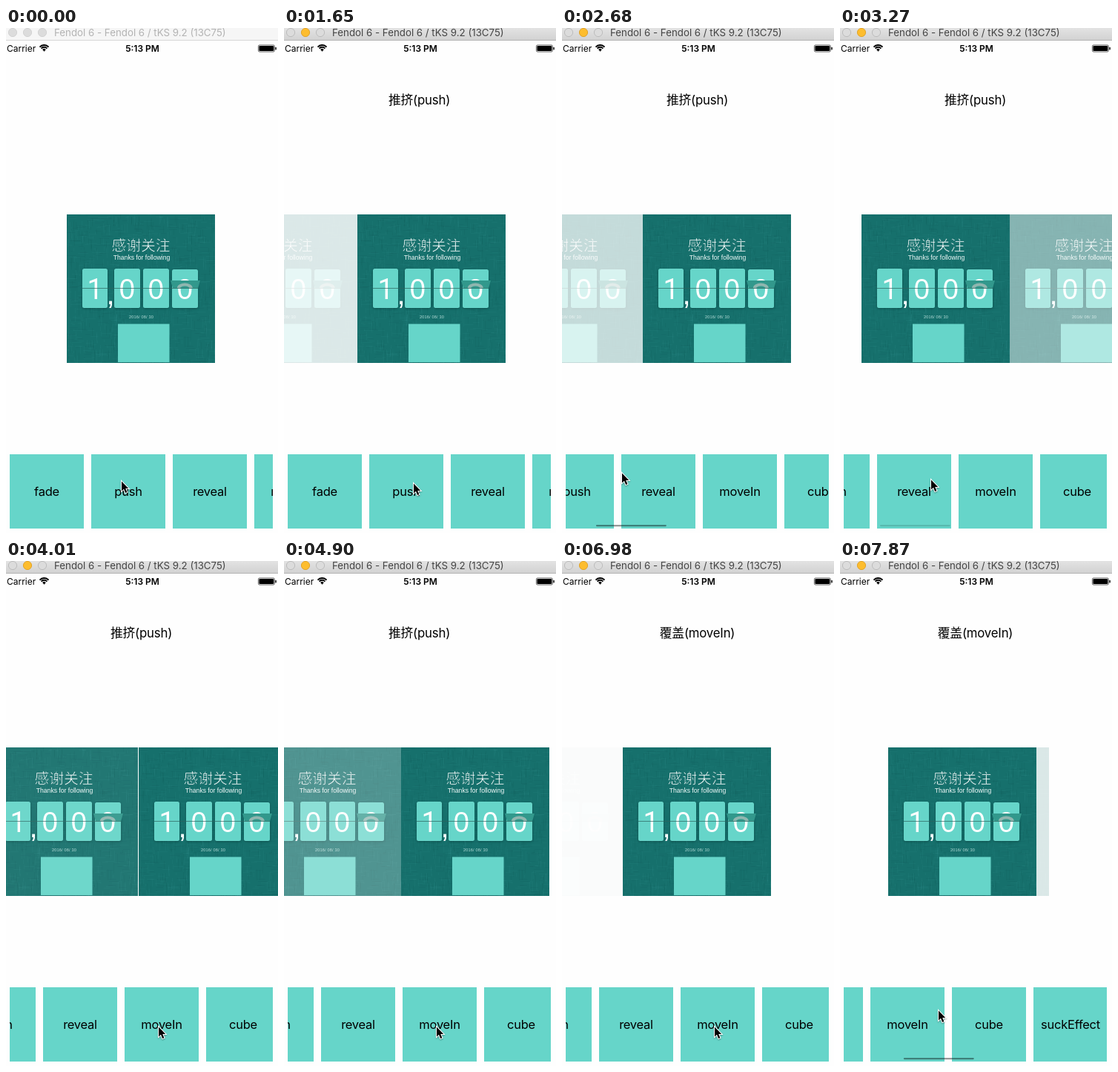
Animation of 367x680 px, one loop 8000 ms. Source, as an HTML page with a canvas:

```html
<!DOCTYPE html>
<html lang="zh-CN">
<head>
<meta charset="utf-8">
<title>Transitions</title>
<style>
html, body { margin: 0; width: 100%; height: 100%; overflow: hidden; background: #fefefe; }
canvas { display: block; }
</style>
</head>
<body>
<canvas id="stage" width="367" height="680"></canvas>
<script>
const W = 367, H = 680, LOOP = 8000, TICKS = 54;
const UI = 'Inter, "Noto Sans CJK SC", "Noto Sans CJK", sans-serif';
const HAN = '"Noto Sans CJK SC", "Noto Sans CJK", sans-serif';
const ARIAL = '"Liberation Sans", Arial, sans-serif';
const MINT = '#66d5c9', TEAL = '#16706c', PAPER = '#fefefe';
const CELLS = ['fade', 'push', 'reveal', 'moveIn', 'cube', 'suckEffect'];

// Times in ticks; RATE is the part of a transition done per tick.
const RATE = 0.15, PUSH = 10.45, REPEATS = 5, MOVE = 46.9;
const DRAGS = [{ from: 14, to: 18, glide: 30 }, { from: 49, to: 53, glide: 0 }];
const STOPS = [
  { from: 0, to: 1, x: 155, y: 612 },
  { from: 4, to: 6.4, x: 244, y: 627 },
  { from: 6.4, to: 9, x: 174, y: 612 },
  { from: 12, to: 14, x: 225, y: 604 },
  { from: 14, to: 18, x: 80, y: 598 },
  { from: 20, to: 26, x: 205, y: 626 },
  { from: 47, to: 49, x: 251, y: 606 },
  { from: 49, to: 53, x: 132, y: 604 }
];

const g = document.getElementById('stage').getContext('2d');
const clamp = v => Math.max(0, Math.min(1, v));
const mix = (a, b, u) => a + (b - a) * u;

function cursorAt(k) {
  let x = 155, y = 609;
  for (const s of STOPS) {
    const u = clamp((k - s.from) / (s.to - s.from));
    x = mix(x, s.x, u);
    y = mix(y, s.y, u);
  }
  return { x, y };
}

// The row follows the cursor during a drag, then glides on.
function scrollAt(k) {
  let off = 0;
  for (const d of DRAGS) {
    if (k < d.from) continue;
    off += cursorAt(d.from).x - cursorAt(Math.min(k, d.to)).x;
    if (k > d.to) off += d.glide * (1 - Math.exp((d.to - k) * 1.6));
  }
  return Math.round(off);
}

const barAlpha = k => Math.max(...DRAGS.map(d =>
  k > d.from ? clamp((d.to + 5 - k) / 3) : 0));

function text(c, s, x, y, font, color, align = 'center', gap = 0) {
  c.font = font;
  c.fillStyle = color;
  c.textAlign = align;
  c.letterSpacing = gap + 'px';
  c.fillText(s, x, y);
}

function box(c, x, y, w, h, r, color) {
  c.fillStyle = color;
  c.beginPath();
  c.roundRect(x, y, w, h, r);
  c.fill();
}

function poly(c, pts) {
  c.beginPath();
  pts.forEach(([x, y]) => c.lineTo(x, y));
  c.closePath();
}

function makePoster() {
  const cv = document.createElement('canvas');
  cv.width = cv.height = 200;
  const c = cv.getContext('2d');
  c.fillStyle = TEAL;
  c.fillRect(0, 0, 200, 200);

  // woven cloth
  let seed = 7;
  const rnd = () => (seed = seed * 16807 % 2147483647) / 2147483647;
  for (let i = 0; i < 1500; i++) {
    c.fillStyle = rnd() < 0.5 ? 'rgba(0,40,40,.05)' : 'rgba(120,220,205,.035)';
    const n = 3 + rnd() * 12, flat = rnd() < 0.5;
    c.fillRect(Math.floor(rnd() * 200), Math.floor(rnd() * 200), flat ? n : 1, flat ? 1 : n);
  }

  // a teal outline thins the strokes of the heading
  text(c, '感谢关注', 100, 49, '300 19.8px ' + HAN, '#fff');
  c.strokeStyle = TEAL;
  c.lineWidth = 0.6;
  c.strokeText('感谢关注', 100, 49);
  text(c, 'Thanks for following', 101, 60.5, '8.6px ' + ARIAL, '#f2fbfa');

  [...'1000'].forEach((d, i) => {
    const x = i ? 25 + 39 * i : 21, top = i === 3 ? 74 : 73;
    c.shadowColor = 'rgba(0,30,30,.4)';
    c.shadowBlur = 3;
    c.shadowOffsetY = 1;
    box(c, x, top, i ? 35 : 34, 126 - top, 2.5, MINT);
    c.shadowColor = 'transparent';
    text(c, d, x + 17.3, 113.5, '38px ' + (i ? ARIAL : 'Roboto, sans-serif'), '#fff');
  });
  text(c, ',', 53.5, 120.5, '40px ' + ARIAL, '#fff', 'left');

  // falling flap
  c.fillStyle = '#32988c';
  poly(c, [[140, 89], [180, 89], [177, 99.5], [143, 99.5]]);
  c.fill();
  c.strokeStyle = '#8fb6af';
  c.lineWidth = 4;
  c.beginPath();
  c.ellipse(159.3, 99.5, 8.5, 5, 0, Math.PI, 2 * Math.PI);
  c.stroke();
  c.fillStyle = 'rgba(45,100,95,.7)';
  c.fillRect(21, 99, 156, 1);

  text(c, '2016/ 08/ 30', 100.5, 140, '5.6px ' + ARIAL, '#b5dcd7', 'center', 0.15);
  c.fillStyle = MINT;
  c.fillRect(69, 147.5, 69.5, 51.5);
  return cv;
}
const poster = makePoster();

function drawPoster(x, alpha) {
  g.globalAlpha = clamp(alpha);
  g.drawImage(poster, Math.round(x), 251);
  g.globalAlpha = 1;
}

// The new poster slides in from the left; push also shoves the old one out.
function drawPicture(k) {
  const moving = k > MOVE;
  const turns = (k - (moving ? MOVE : PUSH)) * RATE;
  if (turns < 0 || turns >= (moving ? 1 : REPEATS)) return drawPoster(82, 1);
  const p = turns % 1;
  drawPoster(moving ? 82 : 82 + 200 * p, 2 * (1 - p) - 0.02);
  drawPoster(-118 + 200 * p, 2 * p - 0.02);
}

function drawWindowBar(active) {
  const fill = g.createLinearGradient(0, 0, 0, 16);
  fill.addColorStop(0, active ? '#e3e3e3' : '#f6f6f6');
  fill.addColorStop(1, active ? '#d2d2d2' : '#f6f6f6');
  g.fillStyle = fill;
  g.fillRect(0, 0, W, 16);
  g.fillStyle = active ? '#b4b4b4' : '#d6d6d6';
  g.fillRect(0, 16, W, 1);
  for (let i = 0; i < 3; i++) {
    const lit = active && i === 1;
    g.fillStyle = lit ? '#fdbd2e' : '#dcdcdc';
    g.strokeStyle = lit ? '#e0a32a' : active ? '#bcbcbc' : '#d2d2d2';
    g.lineWidth = 1;
    g.beginPath();
    g.arc(9 + 20 * i, 6, 5.6, 0, 7);
    g.fill();
    g.stroke();
  }
  text(g, 'Fendol 6 - Fendol 6 / tKS 9.2 (13C75)', 65, 11, '13.3px ' + UI,
    active ? '#444' : '#b3b3b3', 'left');
}

function drawStatus() {
  text(g, 'Carrier', 1, 32, '12px ' + UI, '#000', 'left');
  text(g, '5:13 PM', 184, 32, '600 12px ' + UI, '#000');
  g.strokeStyle = g.fillStyle = '#000';
  g.lineWidth = 1.9;
  for (const r of [8, 5.2]) {
    g.beginPath();
    g.arc(51.5, 31, r, -Math.PI * 0.77, -Math.PI * 0.23);
    g.stroke();
  }
  g.beginPath();
  g.moveTo(51.5, 31.8);
  g.arc(51.5, 31, 3, -Math.PI * 0.78, -Math.PI * 0.22);
  g.fill();
  g.lineWidth = 0.6;
  g.beginPath();
  g.roundRect(340.4, 22.9, 22, 9.2, 1.8);
  g.stroke();
  box(g, 341.4, 23.9, 20, 7.2, 1, '#000');
  box(g, 363.4, 25.8, 1.4, 3.6, 0.7, '#000');
}

function drawCells(k) {
  const off = scrollAt(k);
  g.save();
  g.beginPath();
  g.rect(5, 574, 355, 100);
  g.clip();
  CELLS.forEach((name, i) => {
    const x = 5 + 110 * i - off;
    g.fillStyle = MINT;
    g.fillRect(x, 574, 100, 100);
    text(g, name, x + 50, 630, '16.5px ' + UI, '#000', 'center', -0.25);
  });
  g.globalAlpha = barAlpha(k);
  box(g, 7 + off * 0.268, 668.9, 95, 2.3, 1.1, 'rgba(0,0,0,.4)');
  g.restore();
}

function drawCursor(k) {
  const { x, y } = cursorAt(k);
  g.save();
  g.translate(Math.round(x), Math.round(y));
  poly(g, [[1, 1.5], [1, 14.5], [4, 11.8], [6.2, 17], [8.4, 16], [6.2, 11], [10.2, 11]]);
  g.shadowColor = 'rgba(0,0,0,.35)';
  g.shadowBlur = 2;
  g.shadowOffsetY = 1;
  g.lineWidth = 2;
  g.strokeStyle = '#fff';
  g.stroke();
  g.shadowColor = 'transparent';
  g.fillStyle = '#000';
  g.fill();
  g.restore();
}

function draw(ms) {
  const k = Math.floor(ms / LOOP * TICKS);
  g.fillStyle = PAPER;
  g.fillRect(0, 0, W, H);
  drawWindowBar(k > PUSH);
  drawStatus();
  if (k > PUSH) {
    text(g, k > MOVE ? '覆盖(moveIn)' : '推挤(push)', 182.5, 103, '16.8px ' + UI, '#000', 'center', -0.2);
  }
  drawPicture(k);
  drawCells(k);
  drawCursor(k);
}

const start = performance.now();
function loop() {
  draw((performance.now() - start) % LOOP);
  requestAnimationFrame(loop);
}
loop();
</script>
</body>
</html>
```
